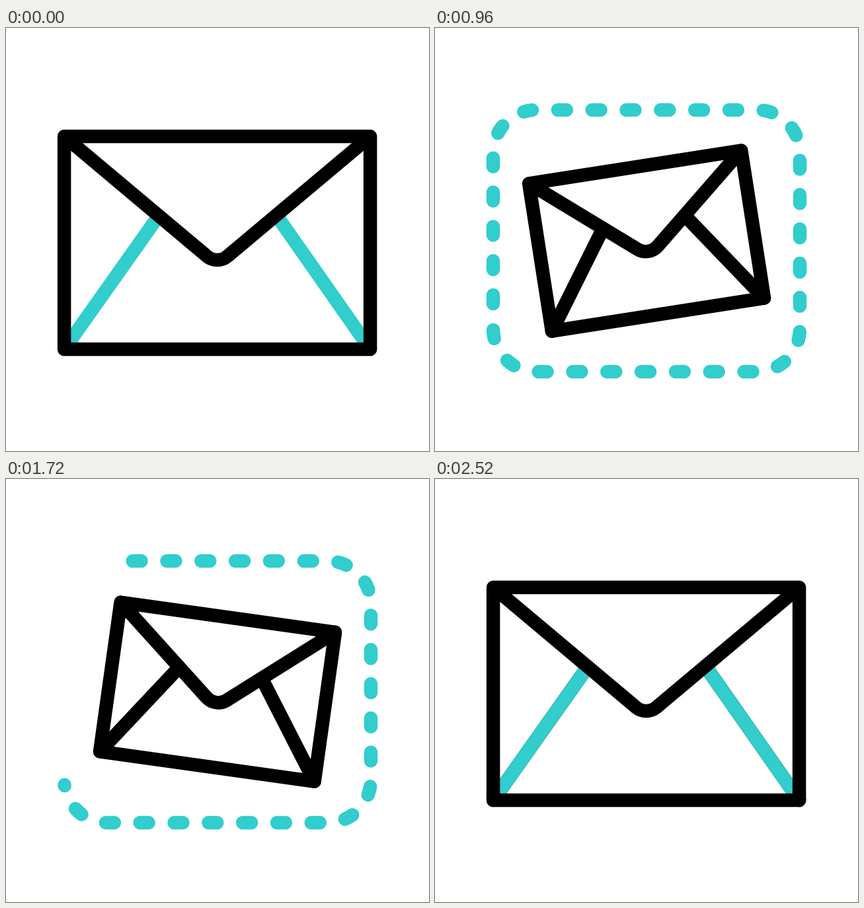
An HTML page with a canvas that plays this animation: 640 by 640 pixels, repeating every 2.6 s.

```html
<!DOCTYPE html>
<html>
<head>
<meta charset="utf-8">
<style>
  html, body { margin: 0; width: 100%; height: 100%; overflow: hidden; background: #fff; }
  canvas { display: block; }
</style>
</head>
<body>
<canvas id="stage" width="640" height="640"></canvas>
<script>
const ctx = document.getElementById('stage').getContext('2d');
const LOOP = 2600, STEP = 40;
const TEAL = '#32cdcd', BLACK = '#000';

// Dashed border: runs anticlockwise from the lower left
const BORDER = 1608, DASH = 13, PERIOD = 51.83, TURN = 1013;
const border = new Path2D();
border.moveTo(88, 457);
border.arc(153, 455, 65, Math.PI - 0.03, Math.PI / 2, true);
border.arcTo(552, 520, 552, 124, 65);
border.arcTo(552, 124, 88, 124, 65);
border.arcTo(88, 124, 88, 520, 65);
border.lineTo(88, 457);

// Timing curve cubic-bezier(a, 0, b, 1) between two times
function ease(t, from, to, a = 0.67, b = 0.33) {
  const x = Math.min(1, Math.max(0, (t - from) / (to - from)));
  let lo = 0, hi = 1;
  for (let i = 0; i < 24; i++) {
    const u = (lo + hi) / 2, v = 1 - u;
    if (3 * u * v * v * a + 3 * u * u * v * b + u * u * u < x) lo = u; else hi = u;
  }
  return x === 0 || x === 1 ? x : lo * lo * (3 - 2 * lo);
}

function strokeDash(start, end) {
  if (end <= start) return;
  ctx.setLineDash([end - start, 9999]);
  ctx.lineDashOffset = -start;
  ctx.stroke(border);
}

function drawBorder(t) {
  ctx.strokeStyle = TEAL;
  if (t < TURN) {
    const length = BORDER * ease(t, 0, 1005, 0.786, 0.385);
    for (let s = 0; s < length; s += PERIOD) strokeDash(s, Math.min(s + DASH, length));
  } else {
    const length = BORDER * (1 - ease(t, TURN, 2520, 0.786, 0.385));
    for (let s = length; s > 6; s -= PERIOD) strokeDash(Math.max(s - DASH, 6), s);
  }
  ctx.setLineDash([]);
}

function drawEnvelope(t) {
  const shrink = ease(t, 90, 780) - ease(t, 1620, 2300);
  const scale = 1 - 0.298 * shrink;
  const degrees = -9.5 * ease(t, 90, 800) + 17.6 * ease(t, 800, 1620) - 8.1 * ease(t, 1620, 2300);
  const angle = degrees * Math.PI / 180;
  const cos = Math.cos(angle) * scale, sin = Math.sin(angle) * scale;
  // Points are placed, not the context, so line widths and the flap radius stay constant
  const at = (x, y) => [
    319.6 + 0.5 * shrink + x * cos - y * sin,
    325 - 3 * shrink + x * sin + y * cos
  ];

  const fold = (side, x, part, color) => {
    if (part <= 0) return;
    const [x0, y0] = at(side * 231.5, 161), [x1, y1] = at(x, -41);
    ctx.strokeStyle = color;
    ctx.beginPath();
    ctx.moveTo(x0, y0);
    ctx.lineTo(x0 + (x1 - x0) * part, y0 + (y1 - y0) * part);
    ctx.stroke();
  };
  const folds = [
    [-1, -88.5, ease(t, 100, 726), ease(t, 1570, 2455)],
    [1, 90, ease(t, 193, 819), ease(t, 1680, 2535)]
  ];
  for (const [side, x, dark, light] of folds) {
    fold(side, x, 1, TEAL);
    fold(side, x, dark, BLACK);
    fold(side, x, light, TEAL);
  }

  const topLeft = at(-231.5, -161), topRight = at(231.5, -161);
  ctx.strokeStyle = BLACK;
  ctx.beginPath();
  ctx.moveTo(...topLeft);
  ctx.lineTo(...topRight);
  ctx.lineTo(...at(231.5, 161));
  ctx.lineTo(...at(-231.5, 161));
  ctx.closePath();
  ctx.moveTo(...topLeft);
  ctx.arcTo(...at(0, 33.3), ...topRight, 24);
  ctx.lineTo(...topRight);
  ctx.stroke();
}

function draw(now) {
  const t = Math.floor(now % LOOP / STEP) * STEP;
  ctx.fillStyle = '#fff';
  ctx.fillRect(0, 0, 640, 640);
  ctx.lineWidth = 20.5;
  ctx.lineCap = ctx.lineJoin = 'round';
  drawBorder(t);
  drawEnvelope(t);
  requestAnimationFrame(() => draw(performance.now()));
}
draw(performance.now());
</script>
</body>
</html>
```
